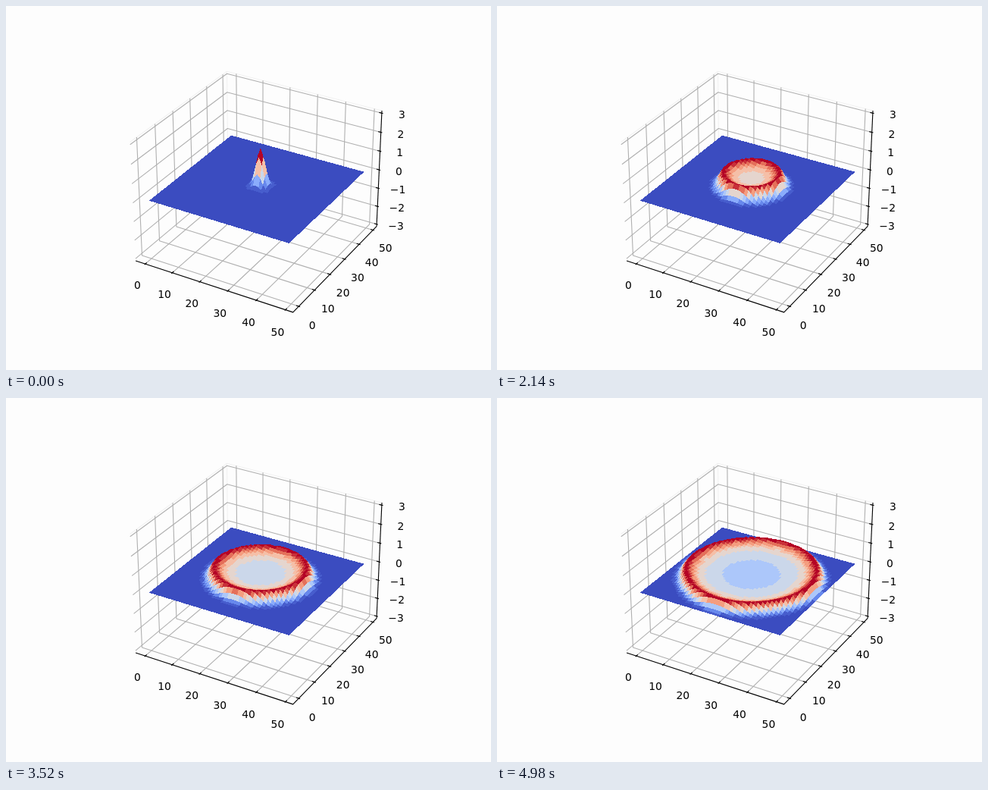
An HTML page with a canvas for the animation above (5 s loop, 640 by 480 pixels).

```html
<!DOCTYPE html>
<html lang="en">
<head>
<meta charset="utf-8">
<title>Expanding wave</title>
<style>
html, body { margin: 0; width: 100%; height: 100%; overflow: hidden; background: #fdfdfd; }
canvas { display: block; width: 640px; height: 480px; }
</style>
</head>
<body>
<canvas id="stage" width="640" height="480"></canvas>
<script>
const W = 640, H = 480, N = 50, FRAMES = 250, STEP = 20;
const ctx = document.getElementById("stage").getContext("2d");

// Perspective view of the box: azimuth -60, elevation 30, distance 10
const BOX = 8 / 7 * 25 / 24, HX = BOX / 2, HZ = HX * 0.75;
const S3 = Math.sqrt(3), SCALE = 1997.84, CX = 333, CY = 237.4;

function project(x, y, z) {
  const right = x * S3 / 2 + y / 2;
  const up = -x / 4 + y * S3 / 4 + z * S3 / 2;
  const depth = 10 - (x * S3 / 4 - y * 0.75 + z / 2);
  return [CX + SCALE * right / depth, CY - SCALE * up / depth];
}
const gridPos = v => (v / (N - 1) - 0.5) * BOX / (1.1 * 25 / 24);
const zPos = v => v / 7;

function line(c, color, ...points) {
  c.strokeStyle = color;
  c.beginPath();
  for (const p of points) c.lineTo(...project(...p));
  c.stroke();
}

function makeCanvas() {
  const el = document.createElement("canvas");
  el.width = W;
  el.height = H;
  return el;
}

function drawAxes(c) {
  const GRID = "#b0b0b0", INK = "#000", FAINT = "#f2f2f2";
  const tickOut = BOX * 0.008, tickIn = BOX * 0.016, pad = 0.0988;
  c.fillStyle = "#fdfdfd";
  c.fillRect(0, 0, W, H);
  c.lineWidth = 1.11;
  c.lineJoin = "round";

  line(c, FAINT, [-HX, -HX, HZ], [-HX, HX, HZ], [HX, HX, HZ]);
  line(c, FAINT, [-HX, HX, HZ], [-HX, HX, -HZ]);

  const across = [0, 10, 20, 30, 40, 50], height = [-3, -2, -1, 0, 1, 2, 3];
  for (const v of across) {
    const p = gridPos(v);
    line(c, GRID, [p, -HX, -HZ], [p, HX, -HZ], [p, HX, HZ]);
    line(c, GRID, [HX, p, -HZ], [-HX, p, -HZ], [-HX, p, HZ]);
  }
  for (const v of height) {
    const p = zPos(v);
    line(c, GRID, [-HX, -HX, p], [-HX, HX, p], [HX, HX, p]);
  }

  line(c, INK, [-HX, -HX, -HZ], [HX, -HX, -HZ], [HX, HX, -HZ]);
  line(c, INK, [HX, HX, -HZ], [HX, HX, HZ]);

  c.fillStyle = INK;
  c.font = '13.89px "DejaVu Sans", sans-serif';
  c.textAlign = "center";
  const label = (v, pos, dy) => {
    const [x, y] = project(...pos);
    c.fillText(String(v).replace("-", "\u2212"), x, y + dy + 5);
  };
  const far = HX + pad, low = -HZ - pad;
  for (const v of across) {
    const p = gridPos(v);
    line(c, INK, [p, -HX - tickOut, -HZ], [p, -HX + tickIn, -HZ]);
    line(c, INK, [HX + tickOut, p, -HZ], [HX - tickIn, p, -HZ]);
    label(v, [p, -far, low], 2.2);
    label(v, [far, p, low], 2.2);
  }
  for (const v of height) {
    const p = zPos(v);
    line(c, INK, [HX + tickOut, HX, p], [HX - tickIn, HX, p]);
    label(v, [far, far, p], 5.4);
  }
}

// Radial wave equation, started as an outgoing Gaussian bump
const DR = 0.1, CELLS = 600, DT = 0.0404;

function laplacian(u, i) {
  if (i === 0) return 4 * (u[1] - u[0]) / (DR * DR);
  return (u[i + 1] - 2 * u[i] + u[i - 1] + (u[i + 1] - u[i - 1]) / (2 * i)) / (DR * DR);
}

function solve() {
  let now = new Float64Array(CELLS), prev = new Float64Array(CELLS);
  for (let i = 0; i < CELLS; i++) {
    const r = i * DR;
    now[i] = 2 * Math.exp(-r * r / 4);
  }
  for (let i = 0; i < CELLS - 1; i++) {
    prev[i] = now[i] - DT * now[i] * i * DR / 2 + DT * DT / 2 * laplacian(now, i);
  }
  const list = [];
  for (let n = 0; n < FRAMES; n++) {
    list.push(now);
    for (let k = 0; k < 2; k++) {
      const next = new Float64Array(CELLS);
      for (let i = 0; i < CELLS - 1; i++) {
        next[i] = 2 * now[i] - prev[i] + DT * DT * laplacian(now, i);
      }
      prev = now;
      now = next;
    }
  }
  return list;
}

const STOPS = [
  [59, 76, 192], [98, 130, 234], [141, 176, 254], [184, 208, 249], [221, 221, 221],
  [245, 196, 173], [244, 154, 123], [222, 96, 77], [180, 4, 38]
];

// Diverging blue-red map in coarse bands, packed as ABGR
function bandColor(t) {
  let q = Math.round((t - 0.04) * 10) / 10 + 0.04;
  if (t < 0.018) q = 0;
  if (q > 1 || t > 0.96) q = 1;
  const s = Math.max(0, q) * 8, i = Math.min(7, Math.floor(s)), f = s - i;
  const [r, g, b] = STOPS[i].map((a, k) => Math.round(a + (STOPS[i + 1][k] - a) * f));
  return (255 << 24 | b << 16 | g << 8 | r) >>> 0;
}
const LUT = Array.from({ length: 256 }, (_, i) => bandColor(i / 255));

const axes = makeCanvas(), layer = makeCanvas();
drawAxes(axes.getContext("2d"));
const layerCtx = layer.getContext("2d");
const image = layerCtx.createImageData(W, H);
const pixels = new Uint32Array(image.data.buffer);
const profiles = solve();

// Hard-edged polygon fill
function fillPoly(pts, color) {
  const ys = pts.map(p => p[1]);
  const top = Math.ceil(Math.min(...ys) - 0.5), end = Math.max(...ys) - 0.5;
  for (let y = top; y < end; y++) {
    const cuts = [], m = y + 0.5;
    for (let k = 0; k < pts.length; k++) {
      const a = pts[k], b = pts[(k + 1) % pts.length];
      if ((a[1] <= m) !== (b[1] <= m)) {
        cuts.push(a[0] + (m - a[1]) * (b[0] - a[0]) / (b[1] - a[1]));
      }
    }
    cuts.sort((a, b) => a - b);
    for (let k = 0; k + 1 < cuts.length; k += 2) {
      const from = Math.ceil(cuts[k] - 0.5), to = Math.ceil(cuts[k + 1] - 0.5);
      pixels.fill(color, y * W + from, y * W + to);
    }
  }
}

function drawSurface(u) {
  const z = [], pt = [];
  for (let i = 0; i < N; i++) {
    for (let j = 0; j < N; j++) {
      const r = Math.hypot(i - 25, j - 25) / DR, k = Math.floor(r);
      const v = u[k] + (u[k + 1] - u[k]) * (r - k);
      z.push(v);
      pt.push(project(gridPos(i), gridPos(j), zPos(v)));
    }
  }
  const quads = [];
  let lo = Infinity, hi = -Infinity;
  for (let i = 0; i < N - 1; i++) {
    for (let j = N - 2; j >= 0; j--) {
      const a = i * N + j, corners = [a, a + 1, a + N + 1, a + N];
      const mean = corners.reduce((s, c) => s + z[c], 0) / 4;
      lo = Math.min(lo, mean);
      hi = Math.max(hi, mean);
      quads.push({ corners, mean });
    }
  }
  pixels.fill(0);
  for (const q of quads) {
    const t = (q.mean - lo) / (hi - lo);
    fillPoly(q.corners.map(c => pt[c]), LUT[Math.round(t * 255)]);
  }
  layerCtx.putImageData(image, 0, 0);
}

let shown = -1;
const start = performance.now();

function tick() {
  const n = Math.floor((performance.now() - start) / STEP) % FRAMES;
  if (n !== shown) {
    shown = n;
    drawSurface(profiles[n]);
    ctx.drawImage(axes, 0, 0);
    ctx.drawImage(layer, 0, 0);
  }
  requestAnimationFrame(tick);
}
tick();
</script>
</body>
</html>
```
